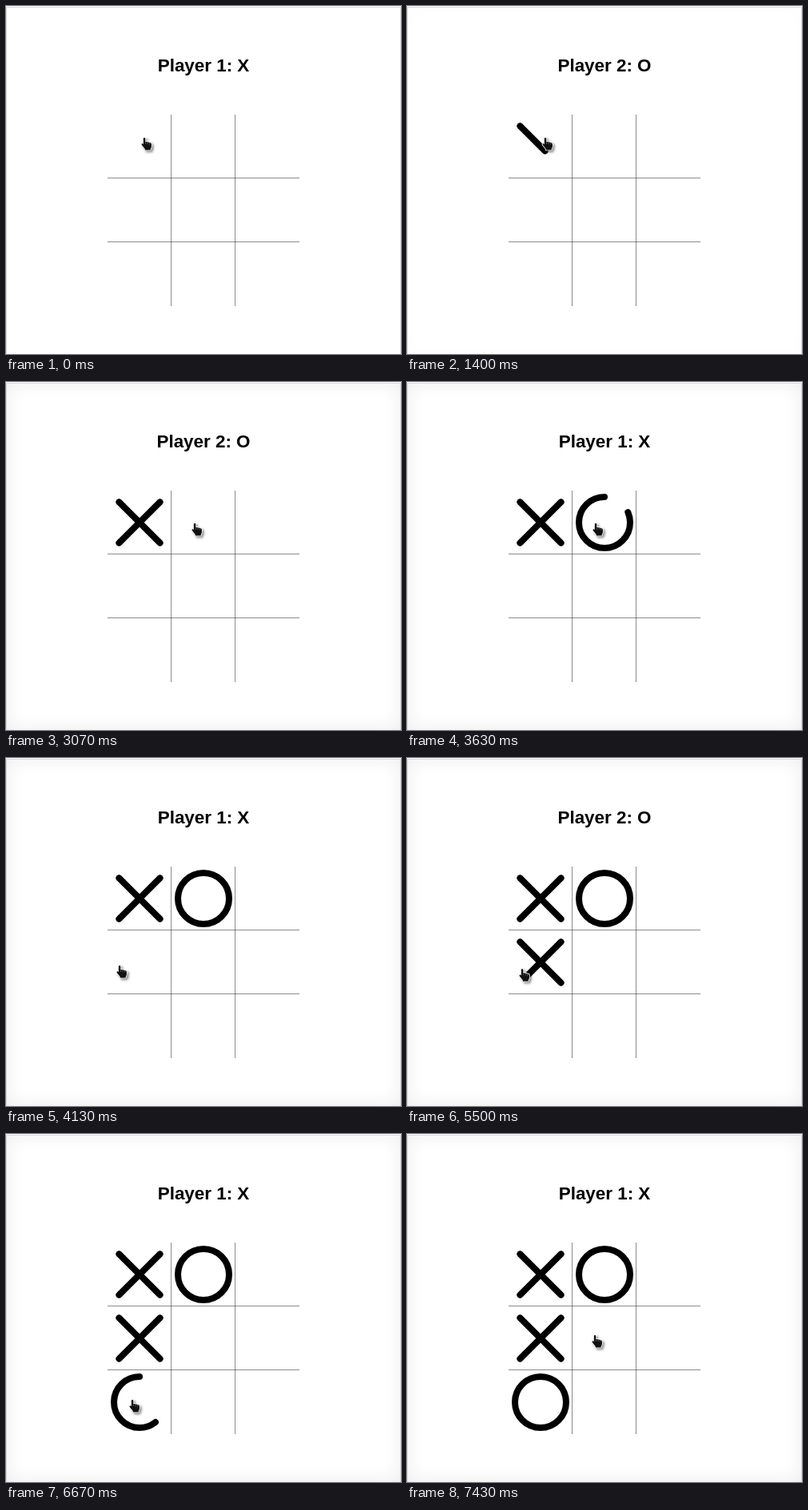
Write an HTML page that moves like this. It is 494 by 436 pixels and loops after 8000 ms.

```html
<!DOCTYPE html>
<html lang="en">
<head>
<meta charset="utf-8">
<title>Tic-tac-toe</title>
<style>
  html, body { margin: 0; width: 100%; height: 100%; overflow: hidden; background: #fff; }
  svg { position: absolute; inset: 0; }
  #vignette { position: absolute; inset: 1px 0 0; box-shadow: inset 0 0 22px rgba(30, 30, 50, .09); }
  #title { font: bold 22.4px "Liberation Sans", Arial, sans-serif; text-anchor: middle; }
  .grid { stroke: #000; stroke-opacity: .45; }
  .mark { fill: none; stroke: #000; stroke-width: 8; stroke-linecap: round; }
  #hand { filter: drop-shadow(2px 2px 1.5px rgba(0, 0, 0, .45)); }
</style>
</head>
<body>
<div id="vignette"></div>
<svg width="494" height="436" viewBox="0 0 494 436">
  <path d="M.5 436V1.5H493.5V436" fill="none" stroke="#d9d9dc"/>
  <text id="title" x="247" y="82"></text>
  <path class="grid" d="M206.5 136V376"/>
  <path class="grid" d="M286.5 136V376"/>
  <path class="grid" d="M127 215.5H367"/>
  <path class="grid" d="M127 295.5H367"/>
  <g id="marks"></g>
  <g id="hand">
    <path d="M171.8 166.3Q171.8 164.9 173 164.9T174.3 166.3V170.3Q176 169.4 177 170.6Q178.6 170 179.4 171.3Q181.8 170.8 181.9 173V176Q181.7 178 180.7 179V180.5H173.7V179L170 174.6Q168.7 172.6 170.2 172.2Q171 172.1 171.8 173.2Z"
      fill="#111" stroke="#fff" stroke-width="1.6" paint-order="stroke" stroke-linejoin="round"/>
    <path d="M174.6 170.5V173M177.2 171V173.2M179.6 171.7V173.6" stroke="#999" stroke-width=".5"/>
  </g>
</svg>
<script>
const LOOP = 8000;
const byId = id => document.getElementById(id);
const clamp = v => Math.min(1, Math.max(0, v));

const moves = [
  { at: 1260, shape: 'X', x: 167, y: 176 },
  { at: 3220, shape: 'O', x: 247, y: 176 },
  { at: 4860, shape: 'X', x: 167, y: 256 },
  { at: 6390, shape: 'O', x: 167, y: 336 }
];

// Hand offsets: time, dx, dy
const handPath = [
  [0, 0, 0], [2370, 0, 0], [2400, 6, 4], [2770, 64, 14], [3040, 64, 14],
  [3070, 63, 12], [3690, 63, 12], [4030, -30, 89], [4130, -31, 95],
  [5470, -31, 95], [5500, -29, 99], [5670, -25, 143], [6030, -15, 168],
  [7200, -15, 168], [7430, 62, 87], [LOOP, 62, 87]
];

// CSS "ease": cubic-bezier(.25, .1, .25, 1)
function ease(x) {
  const curve = (a, b, s) => 3 * a * s * (1 - s) ** 2 + 3 * b * s * s * (1 - s) + s ** 3;
  let lo = 0, hi = 1;
  for (let i = 0; i < 24; i++) {
    const mid = (lo + hi) / 2;
    if (curve(.25, .25, mid) < x) lo = mid; else hi = mid;
  }
  return curve(.1, 1, hi);
}

const strokes = [];
function addStroke(d, start, duration) {
  const path = document.createElementNS('http://www.w3.org/2000/svg', 'path');
  path.setAttribute('class', 'mark');
  path.setAttribute('d', d);
  path.setAttribute('pathLength', 1);
  byId('marks').append(path);
  strokes.push({ path, start, duration });
}

for (const { at, shape, x, y } of moves) {
  if (shape === 'X') {
    addStroke(`M${x - 25.6} ${y - 25.6}l51.2 51.2`, at, 400);
    addStroke(`M${x + 25.6} ${y - 25.6}l-51.2 51.2`, at + 400, 400);
  } else {
    addStroke(`M${x} ${y - 32}a32 32 0 1 0 0 64a32 32 0 1 0 0 -64`, at, 800);
  }
}

function handAt(t) {
  const i = handPath.findIndex(p => p[0] > t);
  const [t0, x0, y0] = handPath[i - 1], [t1, x1, y1] = handPath[i];
  const k = (t - t0) / (t1 - t0);
  return [x0 + (x1 - x0) * k, y0 + (y1 - y0) * k];
}

function draw(now) {
  const t = now % LOOP;
  const played = moves.filter(m => t >= m.at).length;
  byId('title').textContent = played % 2 ? 'Player 2: O' : 'Player 1: X';
  byId('vignette').style.opacity = clamp((t - moves[0].at) / 800);
  for (const { path, start, duration } of strokes) {
    const p = clamp((t - start) / duration);
    path.style.display = p > 0 ? '' : 'none';
    path.style.strokeDasharray = p < 1 ? `${ease(p)} 2` : 'none';
  }
  byId('hand').setAttribute('transform', `translate(${handAt(t)})`);
}

const begin = performance.now();
function tick() {
  draw(performance.now() - begin);
  requestAnimationFrame(tick);
}
tick();
</script>
</body>
</html>
```
